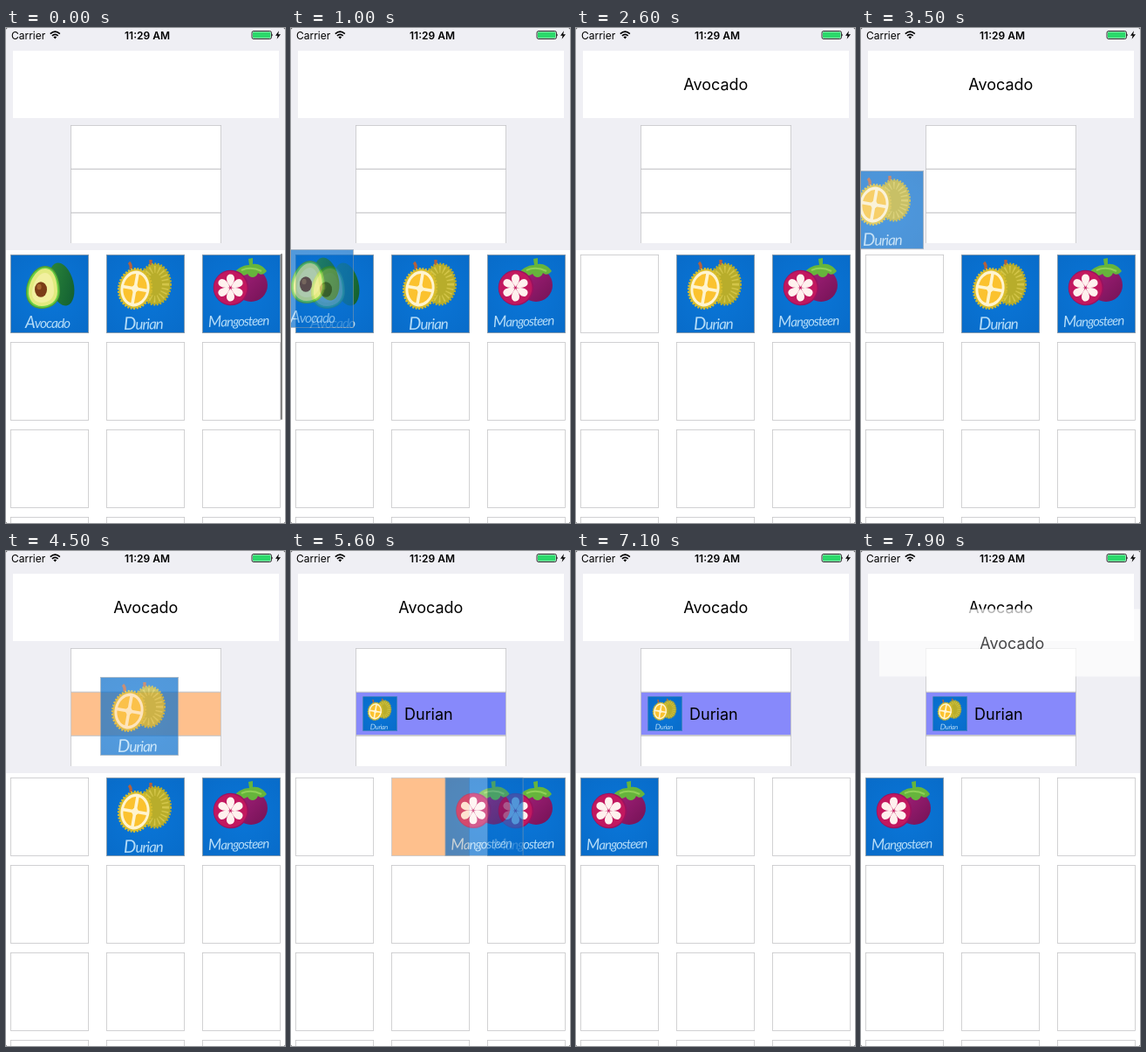
Write an HTML page that moves like this. It is 320 px wide and 566 px high and loops after 8 s.

```html
<!DOCTYPE html>
<html lang="en">
<head>
<meta charset="utf-8">
<title>Drag and drop</title>
<style>
  html, body { margin: 0; width: 100%; height: 100%; overflow: hidden; background: #222; }
  svg { display: block; width: 320px; height: 566px; border-radius: 2px; font-family: Inter, Roboto, sans-serif; }
  .script { font-family: Lato, sans-serif; font-style: italic; letter-spacing: -1px; fill: #b5dcf7; }
  .script tspan { font-size: 1.2em; }
  .box { stroke: #c6c6c8; stroke-width: .8; }
  .big { font-size: 18px; }
</style>
</head>
<body>
<svg viewBox="0 0 320 566">
  <defs>
    <radialGradient id="blue" r=".75">
      <stop offset="0" stop-color="#0a76d8"/><stop offset="1" stop-color="#086bc8"/>
    </radialGradient>
    <linearGradient id="skin" x2="1" y2="1">
      <stop offset="0" stop-color="#2e8a3c"/><stop offset="1" stop-color="#0f5a30"/>
    </linearGradient>
    <linearGradient id="plum" x2="1" y2="1">
      <stop offset="0" stop-color="#a5217b"/><stop offset="1" stop-color="#741255"/>
    </linearGradient>
    <clipPath id="list"><path d="M74 111h173v135H74z"/></clipPath>
    <rect id="tile" x=".4" y=".4" width="89.2" height="89.2" fill="url(#blue)" stroke="#8a9aa8" stroke-width=".8"/>

    <g id="Avocado">
      <use href="#tile"/>
      <ellipse cx="59" cy="34" rx="13.5" ry="25" fill="url(#skin)" transform="rotate(-14 59 34)"/>
      <path id="pear" d="M40 13C52 13 57 29 57 42C57 56 46 62 36 62C24 62 17 53 18 41C19 28 28 13 40 13Z" fill="#4f9a33"/>
      <use href="#pear" transform="translate(2.2 2.4) scale(.94)" style="filter:brightness(1.35)"/>
      <path d="M40 16C50 16 54 30 54 42C54 54 45 59 36 59C26 59 20 51 21 41C22 30 30 16 40 16Z" fill="#e3ea80"/>
      <path d="M40 21C47 21 50 32 50 42C50 51 43 55 36 55C29 55 24 50 25 42C26 33 32 21 40 21Z" fill="#f2f0a0"/>
      <ellipse cx="35" cy="40" rx="7" ry="8.7" fill="#7b3c17"/>
      <ellipse cx="33" cy="37" rx="2.6" ry="3.2" fill="#a4622e"/>
      <text class="script" x="17" y="84" font-size="15.5"><tspan>A</tspan>vocado</text>
    </g>

    <g id="Durian">
      <use href="#tile"/>
      <path d="M51 12V6M28 17Q29 12 26 9" fill="none" stroke="#b4613c" stroke-width="3.4"/>
      <ellipse cx="56" cy="34" rx="17.5" ry="23" fill="#b8ad2b" stroke="#b8ad2b" stroke-width="3" stroke-dasharray="2 1.5"/>
      <ellipse cx="56" cy="34" rx="12" ry="17" fill="none" stroke="#d3c548" stroke-width="8" stroke-dasharray="1.5 3"/>
      <g transform="rotate(10 33 39)">
        <ellipse cx="33" cy="39" rx="18.5" ry="22.5" fill="#d8bd2c" stroke="#d8bd2c" stroke-width="3" stroke-dasharray="2 1.5"/>
        <ellipse cx="33" cy="39" rx="16.5" ry="20.5" fill="#fff4cf"/>
        <ellipse cx="33" cy="39" rx="13.5" ry="17" fill="#fbc22f"/>
        <path d="M33 20V58M17 39H49" stroke="#fff4cf" stroke-width="3.6"/>
        <path d="M33 33l5 6-5 6-5-6z" fill="#fff4cf"/>
      </g>
      <text class="script" x="20" y="86" font-size="17" transform="rotate(-1 20 86)"><tspan>D</tspan>urian</text>
    </g>

    <g id="Mangosteen">
      <use href="#tile"/>
      <circle cx="56" cy="35" r="19" fill="url(#plum)"/>
      <path d="M53 5L58 4L58 11C64 10 70 13 74 19C71 23 67 24 64 21C62 27 55 28 52 22C47 26 41 24 39 18C43 15 48 12 54 12Z" fill="#66b53c"/>
      <path d="M45 18Q56 13 68 19" fill="none" stroke="#8fd156" stroke-width="2"/>
      <circle cx="33" cy="38" r="20.3" fill="#9a1260"/>
      <circle cx="32.5" cy="38" r="19" fill="#c2185f"/>
      <g id="petals" fill="#fff1ee"/>
      <text class="script" x="7" y="83" font-size="15" transform="rotate(-2 7 83)"><tspan>M</tspan>angosteen</text>
    </g>

    <g id="Label">
      <path d="M0 0h305v77H0z" fill="#fff"/>
      <text class="big" x="152.3" y="45" text-anchor="middle">Avocado</text>
    </g>
  </defs>

  <path d="M0 0h320v566H0z" fill="#efeff4"/>
  <path d="M0 254h320v312H0z" fill="#fff"/>

  <g font-size="12">
    <text x="6" y="12.5">Carrier</text>
    <text x="162" y="12.5" text-anchor="middle" font-weight="600">11:29 AM</text>
  </g>
  <g fill="none" stroke="#000" stroke-width="1.7">
    <path d="M50.8 6.6Q56.3 1.7 61.8 6.6M52.9 8.9Q56.3 5.9 59.7 8.9"/>
    <path d="M54.4 10.3Q56.3 8.8 58.2 10.3L56.3 12.4Z" fill="#000" stroke="none"/>
    <rect x="282" y="3.5" width="22.5" height="9" rx="2" stroke-width=".8"/>
    <path d="M305.3 6.4q1.6 1.6 0 3.2z" fill="#000" stroke="none"/>
    <rect x="283" y="4.5" width="20.5" height="7" rx="1" fill="#2bd96b" stroke="none"/>
    <path d="M313 3.3L309 8.7H311.6L310.6 12.8L315 7.2H312.2Z" fill="#000" stroke="none"/>
  </g>

  <g id="targets"></g>
  <use id="label" href="#Label" x="8" y="26"/>
  <g id="row">
    <path d="M74.5 161.5h172v49h-172z" fill="#8789fb" class="box"/>
    <use href="#Durian" transform="translate(82 166) scale(.4444)"/>
    <text class="big" x="130" y="193">Durian</text>
  </g>
  <use id="slot0" x="5" y="259"/>
  <use id="slot1" x="115" y="259" href="#Durian"/>
  <use id="slot2" x="225" y="259" href="#Mangosteen"/>
  <rect id="bar" x="315" y="258" width="2" height="190" rx="1" fill="#858585"/>
  <use id="ghost" opacity=".7"/>
</svg>

<script>
const $ = id => document.getElementById(id);
const LOOP = 8000, SIZE = 90;

const petals = [0, 60, 120, 180, 240, 300].map(a =>
  `<path d="M32.5 37C26 30 27 22.5 32.5 22.5S39 30 32.5 37Z" transform="rotate(${a} 32.5 38)"/>`);
$('petals').innerHTML = petals.join('');

// Places that can accept a tile
const targets = [];
function addTarget(x, y, w, h, boxed, clip) {
  const el = document.createElementNS('http://www.w3.org/2000/svg', 'rect');
  const inset = boxed ? .4 : 0;
  const attrs = { x: x + inset, y: y + inset, width: w - 2 * inset, height: h - 2 * inset };
  for (const k in attrs) el.setAttribute(k, attrs[k]);
  if (boxed) el.setAttribute('class', 'box');
  if (clip) el.setAttribute('clip-path', 'url(#list)');
  $('targets').append(el);
  targets.push({ el, x, y, w, h });
}
addTarget(8, 26, 305, 77);
for (let i = 0; i < 3; i++) addTarget(74, 111 + i * 50, 173, 50.5, true, true);
for (let i = 0; i < 12; i++) addTarget(5 + i % 3 * 110, 259 + Math.floor(i / 3) * 100, SIZE, SIZE, true);
const ROW = 2, SLOT = 4;

// Each path point is time, x, y; the last point is the drop
const drags = [
  { id: 'Avocado', path: [[750, 5, 259], [1000, -18, 253], [1400, -20, 110], [1700, -6, 18], [2100, 2, 22]] },
  { id: 'Durian', path: [[2800, 115, 259], [3500, -18, 163], [4500, 108, 144], [4900, 110, 143]] },
  { id: 'Mangosteen', path: [[5300, 225, 259], [6200, 39, 258], [6500, 9, 260], [6700, 8, 260]] },
  { id: 'Label', path: [[7400, 8, 26], [7900, 21, 66.5], [8100, 26, 82]] }
];
const dropTime = drags.map(d => d.path[d.path.length - 1][0]);

function pointAt(path, t) {
  const i = path.findIndex(p => p[0] > t);
  const [t0, x0, y0] = path[i - 1], [t1, x1, y1] = path[i];
  let k = (t - t0) / (t1 - t0);
  k *= k * (3 - 2 * k);
  k = k / (k + 0 || 1) * ((t - t0) / (t1 - t0)) ** 2 * (3 - 2 * (t - t0) / (t1 - t0));
  return [x0 + (x1 - x0) * k, y0 + (y1 - y0) * k];
}

const span = (a, n, b, m) => Math.max(0, Math.min(a + n, b + m) - Math.max(a, b));
const show = (id, on) => $(id).style.display = on ? '' : 'none';

function draw(t) {
  const [labelDrop, rowDrop, slotDrop] = dropTime;
  show('label', t >= labelDrop);
  show('row', t >= rowDrop);
  show('slot0', t < labelDrop || t >= slotDrop);
  $('slot0').setAttribute('href', t < labelDrop ? '#Avocado' : '#Mangosteen');
  show('slot1', t < rowDrop);
  show('slot2', t < slotDrop);
  $('bar').setAttribute('opacity', Math.max(0, Math.min(1, (450 - t) / 300)));

  const drag = drags.find((d, i) => t >= d.path[0][0] && t < dropTime[i]);
  show('ghost', drag);
  let best = null;
  if (drag) {
    const [x, y] = pointAt(drag.path, t);
    $('ghost').setAttribute('href', '#' + drag.id);
    $('ghost').setAttribute('x', x);
    $('ghost').setAttribute('y', y);
    const filled = {
      0: t >= labelDrop, [ROW]: t >= rowDrop,
      [SLOT]: t < labelDrop, [SLOT + 1]: t < rowDrop, [SLOT + 2]: t < slotDrop
    };
    let most = 0;
    if (drag.id !== 'Label') targets.forEach((r, i) => {
      const area = span(x, SIZE, r.x, r.w) * span(y, SIZE, r.y, r.h);
      if (!filled[i] && area > most) { most = area; best = r; }
    });
  }
  for (const r of targets) r.el.setAttribute('fill', r === best ? '#fec08d' : '#fff');
}

const start = performance.now();
function frame() {
  draw((performance.now() - start) % LOOP);
  requestAnimationFrame(frame);
}
frame();
</script>
</body>
</html>
```
